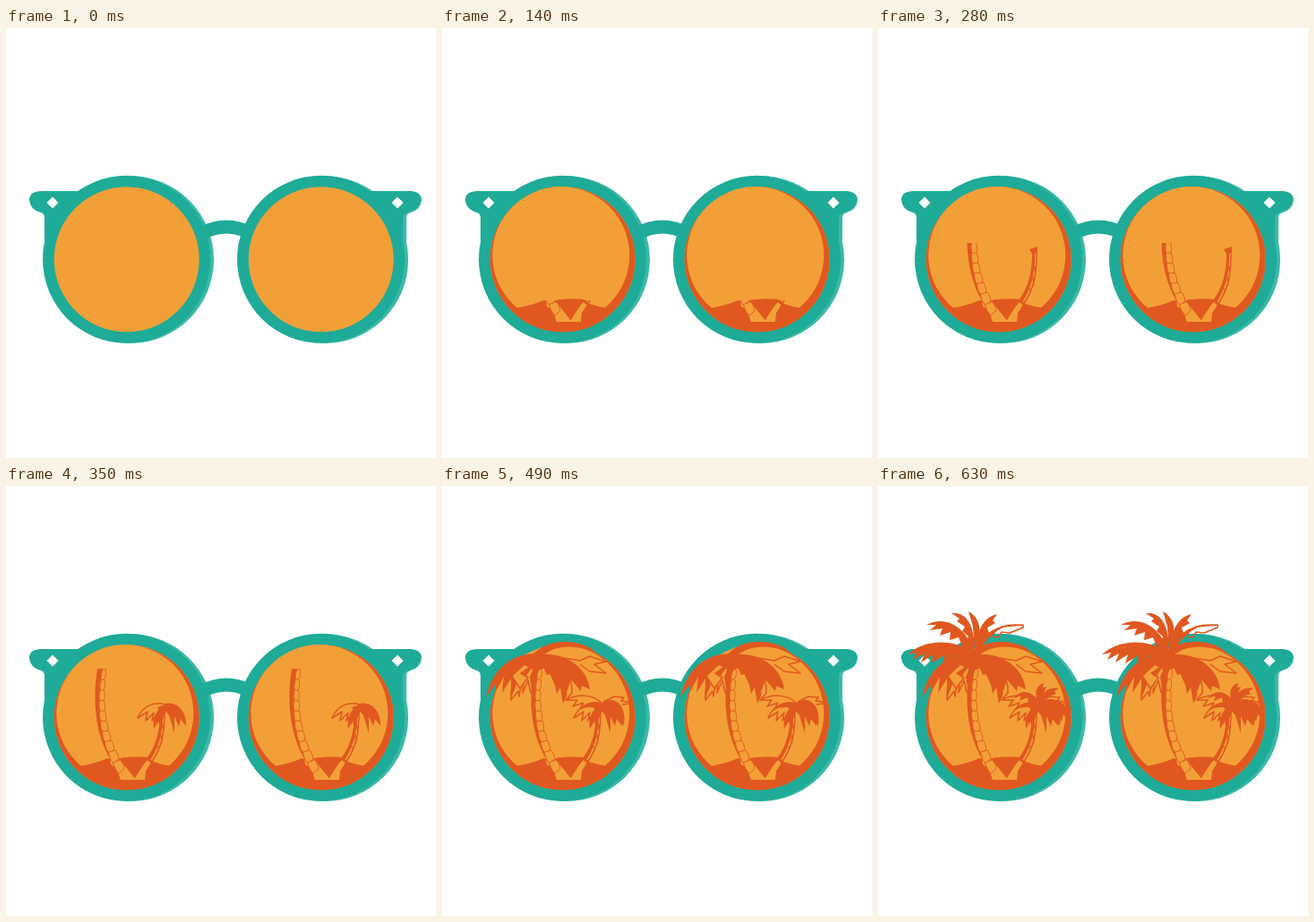
Recreate the animation shown at these times as an HTML page. Size 480 px wide and 480 px high, loop 1430 ms.

```html
<!DOCTYPE html>
<html lang="en">
<head>
<meta charset="utf-8">
<title>Palm sunglasses</title>
<style>
  html, body { margin: 0; width: 100%; height: 100%; overflow: hidden; background: #fff; }
  svg { display: block; width: 100%; height: 100%; }
  .teal { fill: #1eab98; }
  .light { fill: #3ab9a7; }
  .orange { fill: #f39f37; }
  .red { fill: #e0581f; }
  .line { fill: none; stroke: #e0581f; stroke-width: 1.5; stroke-linejoin: round; }
</style>
</head>
<body>
<svg viewBox="0 0 480 480">
  <defs>
    <clipPath id="lensClip"><circle cx="134.7" cy="258.3" r="81"/></clipPath>
    <clipPath id="growth"><rect id="growthRect" x="0" width="480" height="480"/></clipPath>
    <g id="frame">
      <circle cx="134.5" cy="258.3" r="93.5"/>
      <circle cx="351.5" cy="258.3" r="93.5"/>
      <path d="M86 182H40Q26 182 26 192Q27 203 39 206Q43 207 43 212V238L80 215Z"/>
      <path d="M404 182H446Q460 182 460 192Q459 203 447 206Q443 207 443 212V238L406 215Z"/>
    </g>
  </defs>

  <use href="#frame" class="light" x="4" y=".3"/>
  <use href="#frame" class="teal"/>
  <path class="teal" d="M404 182H450Q463 182 463 192Q462 202 449 206L440 210Z"/>
  <path d="M219 229Q246 215 273 229" fill="none" stroke="#1eab98" stroke-width="15"/>
  <path d="M52 188.5l6.5 6.5l-6.5 6.5l-6.5-6.5zM437 188.5l6.5 6.5l-6.5 6.5l-6.5-6.5z" fill="#fff"/>

  <g id="lens">
    <circle class="orange" cx="134.7" cy="258.3" r="81"/>
    <g data-from="1">
      <circle class="red" cx="134.7" cy="258.3" r="81"/>
      <circle class="orange" cx="132.8" cy="253.6" r="76.5"/>
    </g>

    <!-- Island and trunks -->
    <g data-from="2">
      <path class="red" clip-path="url(#lensClip)" d="M81 313Q100 310 113 304L125 306L131 303L158 303L165 308Q176 312 187 313L180 330L135 345L90 330Z"/>
      <path class="orange" d="M116 303L123 303L126 312L130 307L144 326L152 312L158 306L162 309L156 318L155 328H128L123 314L117 311Z"/>
      <path class="red" d="M126 304Q143 301 159 303L143.500 326Z"/>
      <g clip-path="url(#growth)">
        <path class="red" d="M102 204C97 235 98 275 117 306L125 304C109 282 103 247 109 204Z"/>
        <g id="scales"></g>
        <path class="red" d="M169 247L178 244L178 250L175 252C176 277 169 294 160 308L157 304C168 290 172 272 172 252Z"/>
        <path class="line" stroke-width="1" d="M177 250C177 275 175 290 162 309L160 318M174 265l2 8M173 278l1 9M167 290l4 3"/>
      </g>
    </g>

    <!-- Small palm, drooping fronds -->
    <g data-from="5">
      <path class="red" d="M178 243C192 240 202 253 201 268L195 260L193 268L188 257L188 276L182 256L177 250Z"/>
      <path class="line" d="M178 244C165 240 152 246 147 259L158 252L156 262L165 253L163 262L173 250"/>
      <path class="red" d="M178 244L181 247L176 257L172 269L170 263L165 271C163 258 168 249 178 244Z"/>
    </g>

    <!-- Large palm, drooping fronds -->
    <g data-from="6">
      <path class="line" d="M114 193C90 188 76 208 77 239L85 229L86 235C88 218 94 207 105 198M92 209L90 231L96 217L99 231"/>
      <path class="red" d="M115 192C98 188 82 199 78 218C86 203 99 199 104 199L98 213L101 232L106 206L118 202L121 211L126 222L128 232L132 225L135 243L139 235C142 214 133 197 115 192Z"/>
      <path class="line" d="M112 192C135 191 146 214 145 231L139 238"/>
      <path class="red" d="M178 242C167 239 157 244 152 250C160 246 169 247 176 248Z"/>
    </g>

    <!-- Main crowns -->
    <g data-from="7">
      <path class="red" d="M111 188C88 184 58 196 49 236L60 221L60 229L69 213L67 231L77 215L77 237L86 214L89 220L100 202L103 214L112 200L117 211L124 209L128 220L131 212L140 228L144 216L155 229L156 223L165 227C162 202 138 186 111 188Z"/>
      <path class="orange" d="M78 212L92 199L98 202L88 209L96 214L87 226Z"/>
      <path class="line" d="M78 212L92 199L98 202L88 209L96 214L87 226Z"/>
      <path class="red" d="M101 189C116 171 145 170 166 181L174 188C151 176 126 177 112 190Z"/>
      <path class="line" d="M136 192L154 195L165 190L183 196L170 199L183 209L165 207L154 199"/>
      <path class="line" d="M178 242C168 232 151 232 138 239L151 239L146 246L158 242L154 249L169 242"/>
      <path class="red" d="M178 242C191 233 207 243 203 268L196 257L193 263L187 251L180 248Z"/>
      <path class="line" d="M180 241L192 235L203 236L200 240L214 242L201 244"/>
    </g>

    <!-- Spreading fronds -->
    <g data-from="8">
      <path class="red" d="M110 188C83 168 51 172 33 188L43 186L39 194L52 187L48 197L62 188L59 198L74 189L72 197L87 189L96 193Z"/>
      <path class="red" d="M107 188C113 165 137 151 162 155C144 154 133 160 130 165C122 170 116 177 112 189Z"/>
      <path class="line" d="M129 163L138 157L162 155L162 158L147 164L138 163L134 169L128 168"/>
      <path class="red" d="M181 242C169 225 158 229 151 237L160 234L158 240L167 236L168 242L176 242Z"/>
      <path class="red" d="M179 243C173 229 178 222 185 220L184 225L188 224L185 231L188 233L183 243Z"/>
      <path class="red" d="M180 242C184 228 192 224 202 226L197 229L199 232L190 235L184 243Z"/>
      <path class="red" d="M179 242C196 232 214 242 215 264L207 255L205 263L199 251L194 257L190 247Z"/>
    </g>

    <g data-from="9">
      <path class="red" d="M108 186C99 159 77 143 54 155L65 155L58 161L72 159L69 167L81 163L80 172L90 169L94 179Z"/>
      <path class="red" d="M107 186C109 160 101 140 82 142L91 148L88 151L97 157L94 162L101 168L99 174Z"/>
      <path class="red" d="M101 140C111 145 116 157 112 170L108 185L106 157Z"/>
      <path class="red" d="M108 187C110 161 118 146 133 143L128 150L131 153L122 158L124 164L116 170L113 182Z"/>
    </g>
  </g>
  <use href="#lens" x="217"/>
</svg>
<script>
  const STEP = 70, LOOP = 1430, LAST_STEP = 9;
  const trunkTops = [304, 304, 304, 273, 240, 204];
  const growthRect = document.getElementById("growthRect");
  const parts = [...document.querySelectorAll("[data-from]")];

  // Overlapping bark scales widen along the curved trunk.
  const bezier = (a, b, c, d, t) =>
    a * (1 - t) ** 3 + 3 * b * t * (1 - t) ** 2 + 3 * c * t * t * (1 - t) + d * t ** 3;
  let bark = "";
  for (let i = 0; i < 10; i++) {
    const t = i / 9;
    const x = bezier(109, 105, 107, 126, t), y = bezier(210, 246, 279, 312, t);
    const w = 1.8 + 2.5 * t;
    bark += `<path class="orange" stroke="#e0581f" stroke-width=".8"
      transform="translate(${x} ${y}) rotate(${8 - 36 * t})"
      d="M${-w} -6L${w} -5Q${w + 1.5} 3 ${w - 1} 6L${-w} 8Q${-w - 2} 1 ${-w} -6Z"/>`;
  }
  document.getElementById("scales").innerHTML = bark;

  function draw(now) {
    const step = Math.min(LAST_STEP, Math.floor((now % LOOP) / STEP));
    growthRect.setAttribute("y", trunkTops[Math.min(step, trunkTops.length - 1)]);
    for (const part of parts) {
      part.setAttribute("display", step >= +part.dataset.from ? "inline" : "none");
    }
  }

  const start = performance.now();
  function tick() {
    draw(performance.now() - start);
    requestAnimationFrame(tick);
  }
  tick();
</script>
</body>
</html>
```
